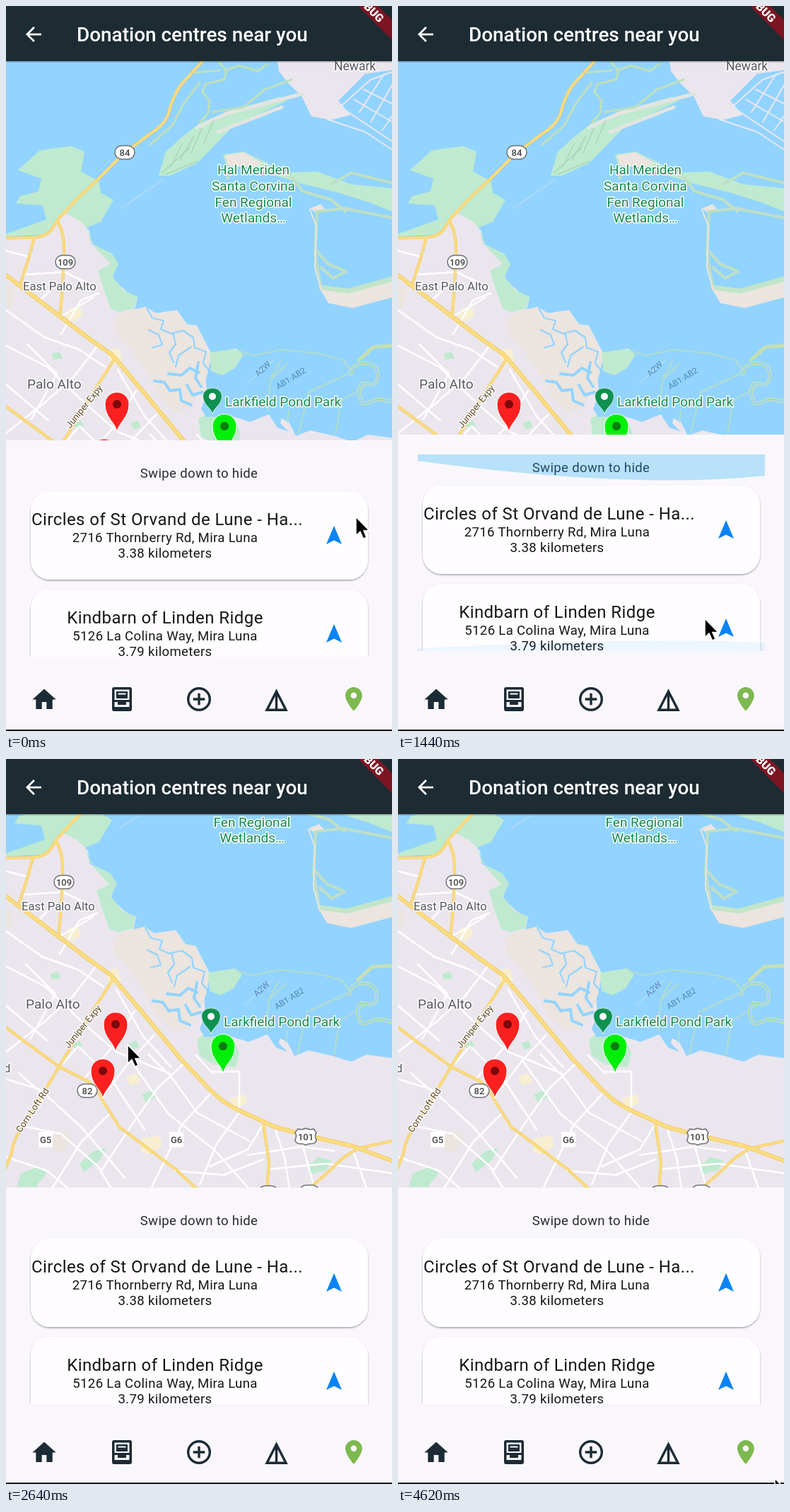
Animation, 546 px wide and 1025 px high, one loop 4680 ms. Source, as an HTML page:

```html
<!DOCTYPE html>
<html lang="en">
<head>
<meta charset="utf-8">
<title>Donation centres</title>
<style>
html, body { margin: 0; width: 100%; height: 100%; overflow: hidden; background: #faf7fc; }
svg { display: block; width: 546px; height: 1025px; font-family: Roboto, "Open Sans", sans-serif; }
.line { fill: none; stroke-linejoin: round; stroke-linecap: round; }
.park { fill: #bfead0; }
.marsh { fill: #ebe4df; }
.land { fill: #ebe6ee; }
.water { fill: #92d4ff; }
.halo text { paint-order: stroke; stroke: #fff; stroke-width: 3px; stroke-linejoin: round; }
.place { fill: #55585d; }
.green { fill: #15894e; font-size: 19px; }
.road { fill: #5d4520; font-size: 13px; }
.pond { fill: #5587b8; font-size: 12px; }
.sign { fill: #444; font-size: 13px; font-weight: 500; }
.mid { text-anchor: middle; }
.name { font-size: 24px; letter-spacing: .43px; }
.info { font-size: 18.6px; letter-spacing: .33px; }

.map, .sheet, .list, .cursor, .touch, .glow { animation: 4680ms linear infinite; }
.map { animation-name: pan; }
.sheet { animation-name: settle; animation-timing-function: ease-out; }
.list { animation-name: scroll; }
.cursor { animation-name: move; }
.touch { animation-name: press; animation-timing-function: step-end; }
.glow { fill: #03a9f4; }
.top { animation-name: glowTop; }
.bottom { animation-name: glowBottom; }

@keyframes settle { 0% { transform: translateY(8px); } 3.9%, 100% { transform: none; } }
@keyframes scroll {
  0%, 12% { transform: translateY(0); }
  16.2%, 20.5% { transform: translateY(-37px); }
  22.7%, 100% { transform: translateY(0); }
}
@keyframes pan {
  0%, 44% { transform: translate(0, 0); }
  52%, 100% { transform: translate(-2px, -188px); }
}
@keyframes move {
  0% { transform: translate(495px, 722px); }
  12% { transform: translate(445px, 815px); }
  16.2% { transform: translate(440px, 778px); }
  19.2%, 20.5% { transform: translate(435px, 708px); }
  29.9%, 30.8% { transform: translate(434px, 866px); }
  42.3%, 44% { transform: translate(411px, 477px); }
  52% { transform: translate(409px, 289px); }
  56.4%, 61% { transform: translate(172px, 404px); }
  71.8%, 100% { transform: translate(533px, 1017px); }
}
@keyframes press {
  0% { opacity: 0; }
  12% { opacity: 1; }
  30.3% { opacity: 0; }
  42.3% { opacity: 1; }
  52% { opacity: 0; }
}
@keyframes glowBottom {
  0%, 16% { transform: scaleY(0); opacity: 0; }
  19.2%, 20.5% { transform: scaleY(.9); opacity: .18; }
  30.8% { transform: scaleY(.4); opacity: .08; }
  34.6%, 100% { transform: scaleY(0); opacity: 0; }
}
@keyframes glowTop {
  0%, 22.7% { transform: scaleY(0); opacity: 0; }
  29.9%, 30.8% { transform: scaleY(1); opacity: .27; }
  43.6% { transform: scaleY(.18); opacity: .07; }
  46.2%, 100% { transform: scaleY(0); opacity: 0; }
}
</style>
</head>
<body>
<svg viewBox="0 0 546 1025">
  <defs>
    <clipPath id="listBox"><path d="M28 634H519V912H28Z"/></clipPath>
    <filter id="shade" x="-5%" y="-5%" width="110%" height="115%">
      <feDropShadow dx="0" dy="1.5" stdDeviation="1.2" flood-color="#000" flood-opacity=".35"/>
    </filter>
    <path id="pin" d="M0 0C-2-13-17-20-17-39A17 17 0 0 1 17-39C17-20 2-13 0 0Z"/>
    <path id="spot" fill-rule="evenodd" d="M12 2C8.1 2 5 5.1 5 9c0 5.3 7 13 7 13s7-7.7 7-13c0-3.9-3.1-7-7-7zm0 9.5a2.5 2.5 0 1 1 0-5 2.5 2.5 0 0 1 0 5z"/>
    <path id="steer" fill="#0a84f5" d="M0-13L11 13 0 7.500-11 13Z"/>
    <rect id="pill" x="-14" y="-9.500" width="28" height="19" rx="9.500" fill="#fff" stroke="#6c7076" stroke-width="1.500"/>
    <path id="bulge" d="M0 0H491V30Q302 50 0 9Z"/>
    <rect id="card" x="35" width="477" height="125" rx="27" fill="#fffdff" filter="url(#shade)"/>
    <g id="highways" class="line">
      <path d="M278 78L247 112Q235 130 231 148T205 180L168 207 130 245 102 271 75 300 64 317Q56 326 40 327L0 328"/>
      <path d="M72 303Q82 318 82 345L80 400 76 440M40 327Q32 360 20 393"/>
      <path d="M154 498L111 566 77 623 40 685 18 720Q11 732 10 745L0 770"/>
      <path d="M0 566L32 590 77 623 117 643Q130 652 137 668L162 708 202 738 242 768 274 798"/>
      <path d="M366 704L374 758 371 800M548 728L502 738Q480 748 462 768L428 798"/>
      <path id="freeway" d="M-3 378L20 396 70 434 120 472 150 493 198 550 250 613 290 655Q309 674 330 684L382 708 426 720 492 735 548 756"/>
    </g>
  </defs>

  <g class="map">
    <path class="water" d="M-5 0H560V810H-5Z"/>

    <!-- western shore -->
    <path class="park" d="M17 232L48 204 92 198 111 206 106 234 132 248 134 264 152 274 134 305 112 314 70 322 0 326V322L57 302 52 282 14 279 20 269 46 262 50 244Z"/>
    <path class="land" d="M-5 328L40 327 62 318 82 292 105 304 118 318 120 336 150 352 157 365 150 385 172 405 186 412 182 430 214 434 242 430 256 450 270 452 284 480 290 496 282 520 284 548 276 570 286 584 320 580 345 588 375 576 400 588 410 608 430 600 465 608 490 616 512 606 550 611V810H-5Z"/>
    <path class="park" d="M114 314L121 336 150 350 159 365 150 382 166 402 186 411 181 428 160 433 148 428 138 400 130 374 148 365 125 340Z"/>
    <path class="marsh" d="M152 443L170 432 198 425 214 436 241 431 256 450 270 452 282 475 291 492 285 520 276 545 256 570 240 574 214 548 196 512 178 488 158 466Z"/>
    <g class="line" stroke="#92d4ff" stroke-width="2.200">
      <path d="M199 427l8 14 16 4-4 12 14 6 18-4 14 10 2 14 16 6-4 16 8 10M202 458l14 7 5 14-14 4M236 462l4 16-9 12 6 14M262 482l-18 12-4 16"/>
      <path d="M210 530l14 2 8 12 14-2 2 16 14 6M230 520l18 2 12-10 12 6M256 536l8 14 14-4M272 504l-4 22 8 12" stroke-width="4"/>
    </g>
    <path class="park" d="M288 490L326 484 336 493 324 512 306 522 290 516Z"/>
    <path class="park" d="M272 584L290 572 322 580 332 603 327 624 296 620 276 608Z"/>
    <path class="water" d="M280 569l24 3 8 8-30 1zM370 575l22-5-4 20 12 12-16-6z"/>
    <path class="marsh" d="M68 722l18-10 10 16-14 16-14-4zM0 392l12 12-4 22-8 2z"/>

    <!-- eastern shore -->
    <path class="land" d="M384 78H550V126L516 136 500 151 460 161 432 156 418 127 401 111 386 92Z"/>
    <path class="water" d="M470 134L508 96 550 90V200L506 176Z"/>
    <path class="line" stroke="#e9e7ee" stroke-width="2" d="M462 152L516 104 550 92M478 146L550 194M492 132L550 166M506 118L550 140M500 150L535 96M516 164L546 112M532 176L550 150M454 160L508 178 546 203"/>
    <path class="park" d="M216 240L226 206 248 186 275 165 310 151 388 128 397 134 321 170 296 196 270 222 232 240Z"/>
    <path class="line" stroke="#e4e4e1" stroke-width="5" d="M270 172L312 152 420 124M300 178L390 143"/>
    <path class="line" stroke="#a9d6b8" stroke-width="1.500" d="M220 236L260 200M232 228l18-34M246 218l20-34M262 208l15-35M280 194l13-32M226 238l44-18"/>
    <path class="line" stroke="#bddfbc" stroke-width="3" d="M300 78l12 13-4 13-26 6-4 12 10 12-2 17-12 14M268 94l34-3M274 108l-24 32-14 28-32 28M292 150l44-7 30-25 38-14M310 91l20-7 26 8 14-10"/>
    <path class="park" d="M307 210L336 206 370 222 386 236 440 234 488 252 550 258V292L515 278 470 264 414 250 370 236 338 226 312 226Z"/>
    <path class="marsh" d="M310 211l26-4 28 16-18 5-32-2zM430 286l15-6 8 9-15 4z"/>
    <path class="line" stroke="#bfdfc4" stroke-width="4" d="M438 291L478 286 550 300M440 292L437 350 446 400M438 345l18 20 25 10-18 10-17-15M320 228l-7 16M400 238l20 24 40 12 20 16M460 252l28-16 58 14"/>
    <path class="marsh" d="M443 398L482 403 550 384V411L490 427 456 420Z"/>
    <path class="line" stroke="#c2e5c8" stroke-width="7" d="M446 398L484 403 550 385"/>
    <path class="line" stroke="#e9e4df" stroke-width="2" d="M430 288l9 24-2 58 9 32"/>
    <path class="line" stroke="#b4dccb" stroke-width="2" d="M330 488L352 494 388 486 440 491 478 501 488 516M374 528l14-26M370 572l4-44 24-22M398 588l2-16M414 604l14-58 60-28M466 606l8-48 34-20"/>
    <path class="line" stroke="#c6dfb2" stroke-width="5" d="M550 480L520 482 500 500M488 520Q490 504 508 505T526 522 512 534 500 548 512 561 528 556 550 560"/>
    <path class="line" stroke="#92d4ff" stroke-width="2" d="M488 520Q490 504 508 505T526 522 512 534 500 548 512 561 528 556 550 560"/>
    <path class="line" stroke="#d6dde6" stroke-width="1" d="M162 286l60-40M340 535l40-36"/>

    <!-- town -->
    <path class="park" d="M106 760l20-18 18-4-8 16-24 18zM22 774l24-9 14 8-16 20h-26zM430 762l14-11 18 4-6 14-22 6zM194 662l16-6 4 10-14 8zM64 492l12-3 4 9-13 2zM176 590l10-4 5 9-10 4zM96 592l10-6 4 8-10 5z"/>
    <path fill="#f8efd0" d="M90 428l14-3 4 12-13 9-10-6zM194 724l26-3 2 14-18 12-12-5zM172 638l14-6 6 13-14 5zM318 668l22-6 4 12-18 7zM142 488l18-4 5 18-16 6z"/>
    <g class="line" stroke="#fff" stroke-width="2.500">
      <path d="M0 430L54 468 104 486 140 510M0 346L34 355M24 380L82 376 116 392M48 416L72 392M76 440l48-28M78 464l28-48 25-10"/>
      <path d="M130 480L96 524 58 558 0 604M0 480L58 510 112 562 158 602 232 632 272 688 346 728M0 535L60 586M30 478L72 520 36 584"/>
      <path d="M158 514L196 580 236 624M212 578L178 614 140 664M184 544L152 596 112 640M78 624L104 594 152 642 198 712"/>
      <path d="M252 620L216 654 178 708 138 768M292 660L250 706 208 794M332 688L300 732 276 790M178 614L232 690 296 740 350 800"/>
      <path d="M230 632L204 606M292 630H332V686M270 606L294 632M366 704L344 740 290 764M382 708L396 752 404 800M344 748L420 736 466 742M418 722L440 800M374 768L454 760 550 774M492 740L514 800"/>
      <path d="M0 640L50 655 110 710 170 780M52 660L20 632M20 706L80 718 132 764 154 800M64 800L108 730 148 690M0 750L60 770 96 800M240 770L310 776 366 754"/>
    </g>
    <use href="#highways" stroke="#f1cb68" stroke-width="4.200"/>
    <use href="#freeway" stroke="#f1cb68" stroke-width="6" class="line"/>
    <use href="#highways" stroke="#fcdd80" stroke-width="2.600"/>
    <use href="#freeway" stroke="#fcdd80" stroke-width="4" class="line"/>

    <!-- labels -->
    <g class="sign mid">
      <use href="#pill" x="168" y="207"/><text x="168" y="212">84</text>
      <use href="#pill" x="84" y="362"/><text x="84" y="367">109</text>
      <use href="#pill" x="117" y="657"/><text x="117" y="662">82</text>
      <use href="#pill" x="373" y="801"/><use href="#pill" x="431" y="800"/>
      <path fill="#fff" d="M48 715h20v22H48zM233 715h20v22h-20z"/>
      <text x="58" y="731">G5</text><text x="243" y="731">G6</text>
      <path fill="#fff" stroke="#6c7076" stroke-width="1.500" d="M415 711q5 2 11-1 6 3 11 1l4 5q-3 5 0 10 0 6-8 6-5 0-7 2-2-2-7-2-8 0-8-6 3-5 0-10z"/>
      <text x="426" y="727">101</text>
    </g>
    <g class="halo">
      <g class="place">
        <text x="464" y="91" font-size="17.500">Newark</text>
        <text x="24" y="402" font-size="16.700">East Palo Alto</text>
        <text x="30" y="541" font-size="19.100">Palo Alto</text>
        <text x="-1" y="631" font-size="16.700">d</text>
      </g>
      <g class="green">
        <g class="mid">
          <text x="350" y="238">Hal Meriden</text>
          <text x="350" y="261">Santa Corvina</text>
          <text x="350" y="284">Fen Regional</text>
          <text x="350" y="306">Wetlands…</text>
        </g>
        <text x="310" y="566">Larkfield Pond Park</text>
      </g>
      <g class="road mid">
        <text transform="translate(114 569) rotate(-51)">Juniper Expy</text>
        <text transform="translate(43 687) rotate(-56)">Corn Loft Rd</text>
      </g>
    </g>
    <g class="pond mid">
      <text transform="translate(366 516) rotate(-43)">A2W</text>
      <text transform="translate(405 530) rotate(-32)">AB1·AB2</text>
    </g>

    <!-- markers -->
    <g stroke="#fff" stroke-width="1">
      <use href="#pin" transform="translate(292 577) scale(.79 .66)" fill="#0e9150"/>
      <use href="#pin" x="157" y="602" fill="#fb2020"/>
      <use href="#pin" x="139" y="668" fill="#fb2020"/>
      <use href="#pin" x="309" y="633" fill="#00ef08"/>
    </g>
    <circle cx="292" cy="552" r="5" fill="#fff"/>
    <circle cx="157" cy="563" r="6" fill="#7c080b"/>
    <circle cx="139" cy="629" r="6" fill="#7c080b"/>
    <circle cx="309" cy="594" r="6" fill="#087c0c"/>
  </g>

  <g class="sheet">
    <path fill="#faf7fc" d="M0 606H546V1025H0Z"/>
    <g clip-path="url(#listBox)">
      <g class="list" fill="#151517">
        <text class="info mid" x="273" y="659" fill="#2b2b2e">Swipe down to hide</text>
        <use href="#card" y="678"/>
        <text class="name" x="36" y="726">Circles of St Orvand de Lune - Ha...</text>
        <g class="info mid">
          <text x="225" y="750">2716 Thornberry Rd, Mira Luna</text>
          <text x="225" y="772">3.38 kilometers</text>
        </g>
        <use href="#steer" x="464" y="740"/>
        <use href="#card" y="817"/>
        <text class="name mid" x="225" y="865">Kindbarn of Linden Ridge</text>
        <g class="info mid">
          <text x="225" y="889">5126 La Colina Way, Mira Luna</text>
          <text x="225" y="911">3.79 kilometers</text>
        </g>
        <use href="#steer" x="464" y="879"/>
      </g>
      <g transform="translate(28 634)"><use href="#bulge" class="glow top"/></g>
      <g transform="translate(28 912) scale(1 -1)"><use href="#bulge" class="glow bottom"/></g>
    </g>
  </g>

  <!-- bottom navigation -->
  <path fill="#faf7fc" d="M0 921H546V1025H0Z"/>
  <g fill="#1c2b35">
    <path transform="translate(34 960.500) scale(1.67)" d="M10 20v-6h4v6h5v-8h3L12 3 2 12h3v8z"/>
    <path fill-rule="evenodd" d="M153 963h22q3 0 3 3v28q0 3-3 3h-22q-3 0-3-3v-28q0-3 3-3zM153.500 966.500v27h21v-27z"/>
    <path d="M156 969h16v10h-16zM153 981h22v3h-22zM158 984h12v4h-12zM153 991h22v3h-22z"/>
    <path fill="#faf7fc" d="M158.500 971.500h11v2h-11z"/>
    <g class="line" stroke="#1c2b35" stroke-width="3.400" style="stroke-linecap:butt">
      <circle cx="273" cy="980" r="15.300"/>
      <path d="M273 971.700v16.600M264.700 980h16.600"/>
      <path style="stroke-linejoin:miter" d="M382.500 969L369 995.300H396ZM382.500 970V995"/>
    </g>
  </g>
  <use href="#spot" transform="translate(471.500 959.500) scale(1.7)" fill="#7db94f"/>
  <path fill="#15171a" d="M0 1023H546V1025H0Z"/>

  <!-- app bar -->
  <path fill="#000" opacity=".18" d="M0 78H546V80H0Z"/>
  <path fill="#1d2b33" d="M0 0H546V78H0Z"/>
  <path fill="#fff" transform="translate(22.500 23.600) scale(1.37)" d="M20 11H7.830l5.590-5.590L12 4l-8 8 8 8 1.410-1.410L7.830 13H20z"/>
  <text x="100" y="50" fill="#fff" font-size="27.900" font-weight="500">Donation centres near you</text>
  <path fill="#7c1522" d="M498 0H526L546 20V48Z"/>
  <text class="mid" transform="translate(516.500 13) rotate(45)" fill="#fff" font-size="16" font-weight="900">BUG</text>

  <g class="cursor">
    <circle class="touch line" r="40" cy="1" stroke="#0b0b0d" stroke-width="2.600"/>
    <path stroke="#fff" stroke-width="1.600" d="M0 0V26.500L6 21 10.500 31 15 29 11 19.500H19Z"/>
  </g>
</svg>
</body>
</html>
```
